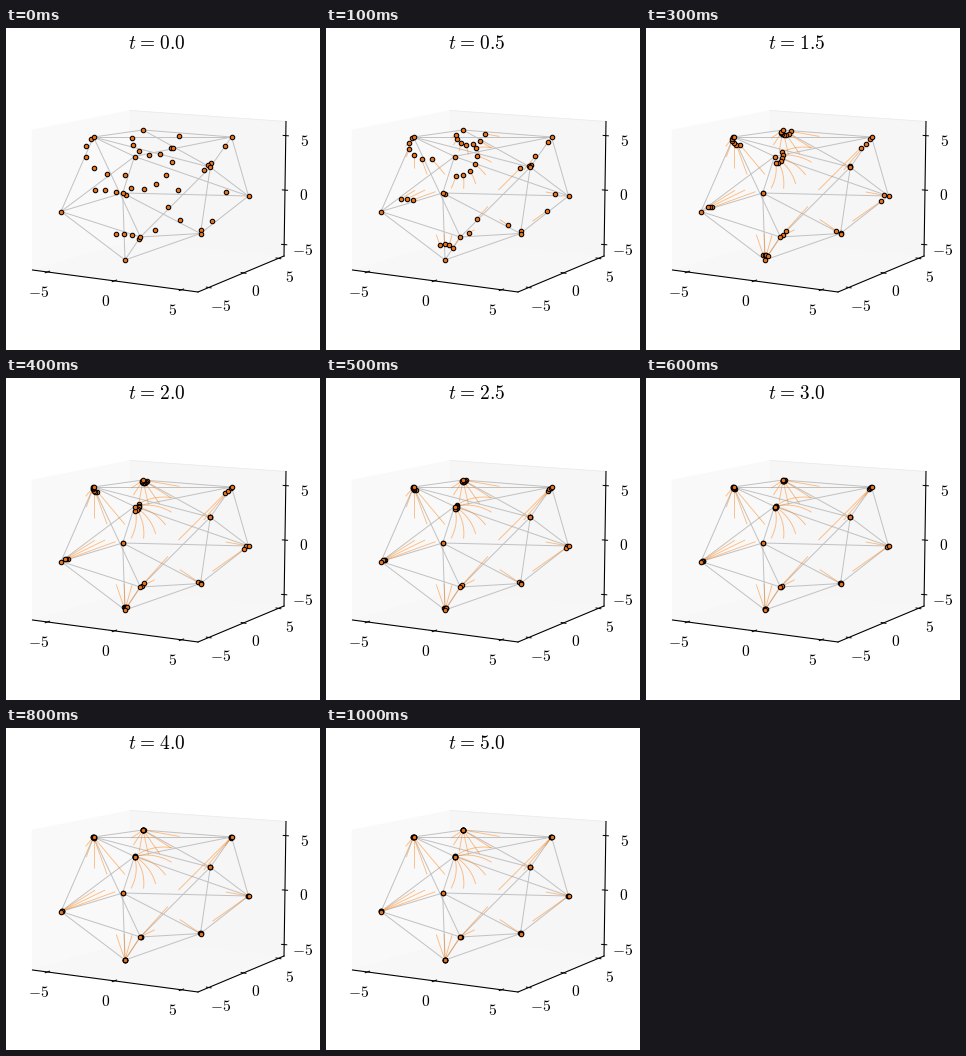
A matplotlib script that plays this animation: 314 by 322 pixels, repeating every 1.1 s.

```python
import numpy as np
import matplotlib.pyplot as plt
from matplotlib.animation import FuncAnimation
from matplotlib.collections import LineCollection

W, H, DPI = 314, 322, 100
PX = 72 / DPI
FRAMES, INTERVAL, DT = 11, 100, 0.5
RATE = 1.05

plt.rcParams["mathtext.fontset"] = "cm"

# Hull vertices as x + iy, in stage pixels
HULL = {
    "A": 87.5 + 109j, "B": 137 + 102j, "C": 225.5 + 109j, "D": 242.5 + 168j,
    "E": 194.5 + 205.5j, "F": 119 + 232j, "G": 55 + 183.5j,
    "H": 128.5 + 128.5j, "I": 204.3 + 139.2j, "J": 116.7 + 165j,
    "K": 134.4 + 209j,
}
OUTLINE = "ABCDEFGA"
SPOKES = {"A": "C", "H": "ACDGJ", "J": "GDEF", "I": "ABCDEK", "K": "AEFG"}

# Points fan out around each vertex: count, angles, distances
FANS = {
    "A": (6, (50, 150), (49, 3)), "B": (7, (10, 145), (37, 14)),
    "C": (3, (135, 125), (75, 11)), "D": (2, (190, 145), (23, 44)),
    "E": (2, (214, 284), (25, 4)), "F": (4, (251, 303), (27, 25)),
    "G": (3, (340, 328), (58, 40)), "H": (6, (-13, 96), (39, 32)),
    "I": (2, (277, 225), (4, 3)), "J": (1, (36, 36), (4, 4)),
    "K": (2, (333, 312), (16, 41)),
}
CURL = {"H": 0.4}


def fan(count, angles, reach):
    turn = np.radians(np.linspace(*angles, count))
    return np.linspace(*reach, count) * np.exp(1j * turn)


def xy(z):
    return np.stack([np.real(z), np.imag(z)], axis=-1)


corners = np.array(list(HULL.values()))
goal = np.concatenate([np.full(f[0], HULL[k]) for k, f in FANS.items()])
offset = np.concatenate([fan(*f) for f in FANS.values()])
curl = np.concatenate([np.full(f[0], CURL.get(k, 0)) for k, f in FANS.items()])


def positions(t):
    left = np.exp(-RATE * t)
    return goal + offset * left * (1 - 1j * curl * (1 - left))


fig = plt.figure(figsize=(W / DPI, H / DPI), dpi=DPI, facecolor="white")
ax = fig.add_axes([0, 0, 1, 1])
ax.set(xlim=(0, W), ylim=(H, 0))
ax.axis("off")


def pane(points, color):
    ax.fill(*xy(points).T, fc=color, ec=color, lw=0.5 * PX, zorder=0)


def line(a, b, width, color="black", z=1):
    ax.plot(*xy([a, b]).T, color=color, lw=width * PX, zorder=z,
            solid_capstyle="projecting")


def label(at, text, size=15.5):
    return ax.text(at.real, at.imag, f"${text}$", fontsize=size * PX,
                   ha="center", va="center", zorder=6)


def axis(a, b, middle, tick, shift):
    line(a, b, 1.1)
    for n in (-5, 0, 5):
        p = a + (b - a) * (middle + 0.081 * n)
        line(p - tick, p + tick, 1)
        label(p + shift, n)


left, back, right, front = 26.5 + 242j, 124 + 214j, 278 + 228j, 192 + 264j
top_left, top_back, top_right = 26 + 102j, 124 + 82.5j, 280 + 93.5j
pane([left, back, top_back, top_left], "#f9f9f9")
pane([back, right, top_right, top_back], "#f6f6f6")
pane([left, back, right, front], "#f7f7f7")
line(top_back, top_right, 0.8, "#ebebeb", 0)

axis(left, front, 0.495, 2.2 - 0.8j, -9 + 20.5j)
axis(front, right, 0.53, 2.4 + 0.4j, 11.5 + 19j)
axis(right, top_right, 0.49, 2.6 + 0.2j, 18.5 + 5.5j)


def heading(t):
    return rf"t\hspace{{0.08}}=\hspace{{0.08}}{t:.1f}"


title = label(151 + 15j, heading(0), 19.3)

edges = list(zip(OUTLINE, OUTLINE[1:]))
edges += [(hub, end) for hub, ends in SPOKES.items() for end in ends]
ax.add_collection(LineCollection([xy([HULL[a], HULL[b]]) for a, b in edges],
                                 colors="#c2c2c2", linewidths=PX, zorder=2))
trails = LineCollection([], colors="#ff7f0e", alpha=0.5,
                        linewidths=0.9 * PX, zorder=3)
ax.add_collection(trails)
dots, = ax.plot([], [], "o", ms=4.5 * PX, mfc="#f07414", mec="black",
                mew=1.05 * PX, zorder=4, snap=False)


def update(i):
    t = i * DT
    paths = np.array([positions(s) for s in np.linspace(0, t, 4 * i + 2)])
    trails.set_segments(list(xy(paths.T)) if i else [])
    dots.set_data(*xy(np.append(paths[-1], corners)).T)
    title.set_text(f"${heading(t)}$")
    return trails, dots, title


anim = FuncAnimation(fig, update, frames=FRAMES, interval=INTERVAL,
                     init_func=lambda: update(0), repeat=True, repeat_delay=0)
plt.show()
```
